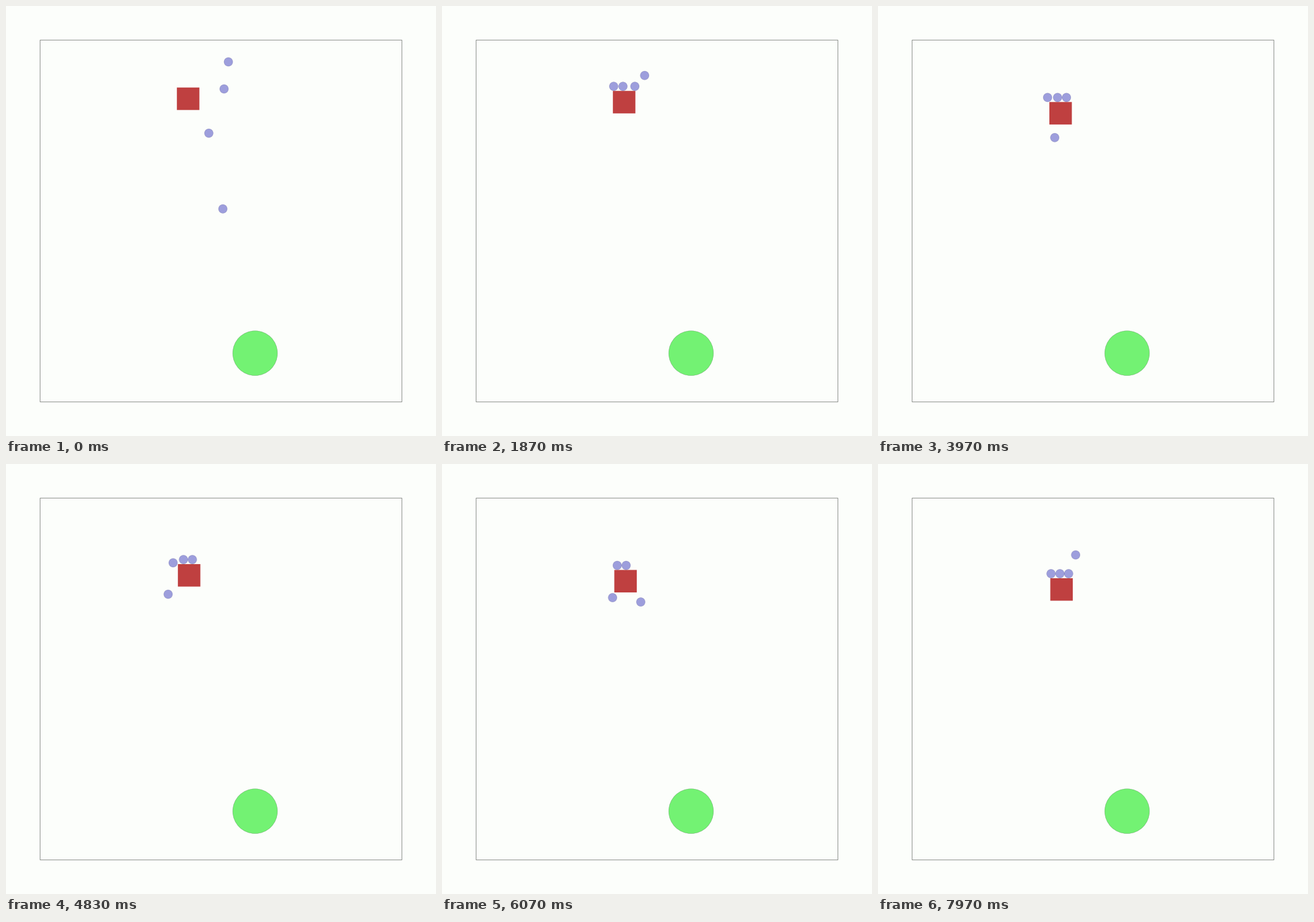
Recreate the animation shown at these times as a matplotlib script. Size 700 by 700 pixels, loop 8 s.

```python
import numpy as np
import matplotlib.pyplot as plt
from matplotlib.animation import FuncAnimation
from matplotlib.patches import Circle, Rectangle

SIZE, DPI = 700, 100
FRAMES, INTERVAL = 250, 32
DOT_R, BOX, GOAL_R = 7.1, 36.6, 36.4
REACH = 25.7   # distance from the box centre to a dot touching a side
PX = 72 / DPI  # one pixel in points


def box_at(t):
    """The box rests, then is pushed down ever more slowly."""
    push = max(t - 1.25, 0)
    u = np.clip((t - 2.7) / 3.3, 0, 1)
    return 296.5 + 2.3 * u * u * (3 - 2 * u), 151 + 9.2 * push - 0.19 * push ** 2


def row(slot, start, stop, turn=0):
    """Keys for a dot that rests on the box and slips slowly to the left."""
    for t in np.linspace(start, stop, 6):
        x = slot - 25 * (1 - np.exp((2.73 - t) / 2.6))
        yield t, turn - np.degrees(np.arctan2(x, REACH)), 0


def smooth(keys, t):
    """Cubic interpolation of (seconds, angle, gap) keys."""
    keys = np.array(keys, float)
    times, p = keys[:, 0], keys[:, 1:]
    slope = np.gradient(p, times, axis=0)
    i = np.clip(np.searchsorted(times, t, side="right") - 1, 0, len(times) - 2)
    h = times[i + 1] - times[i]
    u = np.clip((t - times[i]) / h, 0, 1)
    return ((1 + 2 * u) * (1 - u) ** 2 * p[i] + u * (1 - u) ** 2 * h * slope[i]
            + u ** 2 * (3 - 2 * u) * p[i + 1] + u ** 2 * (u - 1) * h * slope[i + 1])


def dot_at(keys, t):
    """Angle runs anticlockwise from the top; gap is the clearance to the box."""
    angle, gap = smooth(keys, t)
    s, c = np.sin(np.radians(angle)), np.cos(np.radians(angle))
    r = REACH / max(abs(s), abs(c)) + max(gap, 0)
    x, y = box_at(t)
    return x - r * s, y - r * c


DOTS = [
    [(0, -47.5, 54), (1.03, -0.6, 23.4), *row(-27, 1.4, 2.4), (2.73, 57, 1.5),
     (3.97, 166.5, 14.3), (4.83, 132, 11.3), (6.07, 218, 10),
     *row(33.2, 7.3, 8, 360)],
    [(0, -74.7, 34), (1.03, -17.4, 18.2), *row(-12, 1.4, 4.4), (4.83, 53, 0.5),
     (6.07, 143.6, 1.5), (7.97, 338, 33)],
    [(0, -149, 35.4), (1.03, -35.4, 30), *row(4.5, 1.4, 8)],
    [(0, -162.5, 161), (0.5, -151, 89), (1.03, -114.7, 35), (1.6, -45, 33),
     *row(19, 2.3, 8)],
]

fig = plt.figure(figsize=(SIZE / DPI, SIZE / DPI), dpi=DPI, facecolor="#fcfefb")
ax = fig.add_axes([0, 0, 1, 1])
ax.set(xlim=(0, SIZE), ylim=(SIZE, 0))
ax.axis("off")


def style(r, g, b, alpha=1):
    """Fill with a thin, half as bright outline."""
    return dict(fc=(r, g, b, alpha), ec=(r / 2, g / 2, b / 2, alpha / 2), lw=0.6 * PX)


ax.add_patch(Rectangle((55.3, 55.3), 589, 589, fill=False, ec="#8e918e", lw=PX))
ax.add_patch(Circle((405.5, 565.2), GOAL_R, **style(0.45, 0.95, 0.45)))
box = ax.add_patch(Rectangle((0, 0), BOX, BOX, fc=(0.75, 0.25, 0.25), lw=0,
                             snap=False))
dots = [ax.add_patch(Circle((0, 0), DOT_R, **style(0.25, 0.25, 0.75, 0.5)))
        for _ in DOTS]


def draw(k):
    t = k * INTERVAL / 1000
    x, y = box_at(t)
    box.set_xy((x - BOX / 2, y - BOX / 2))
    for dot, keys in zip(dots, DOTS):
        dot.center = dot_at(keys, t)
    return [box, *dots]


anim = FuncAnimation(fig, draw, frames=FRAMES, init_func=lambda: draw(0),
                     interval=INTERVAL, repeat=True, repeat_delay=0)
plt.show()
```
